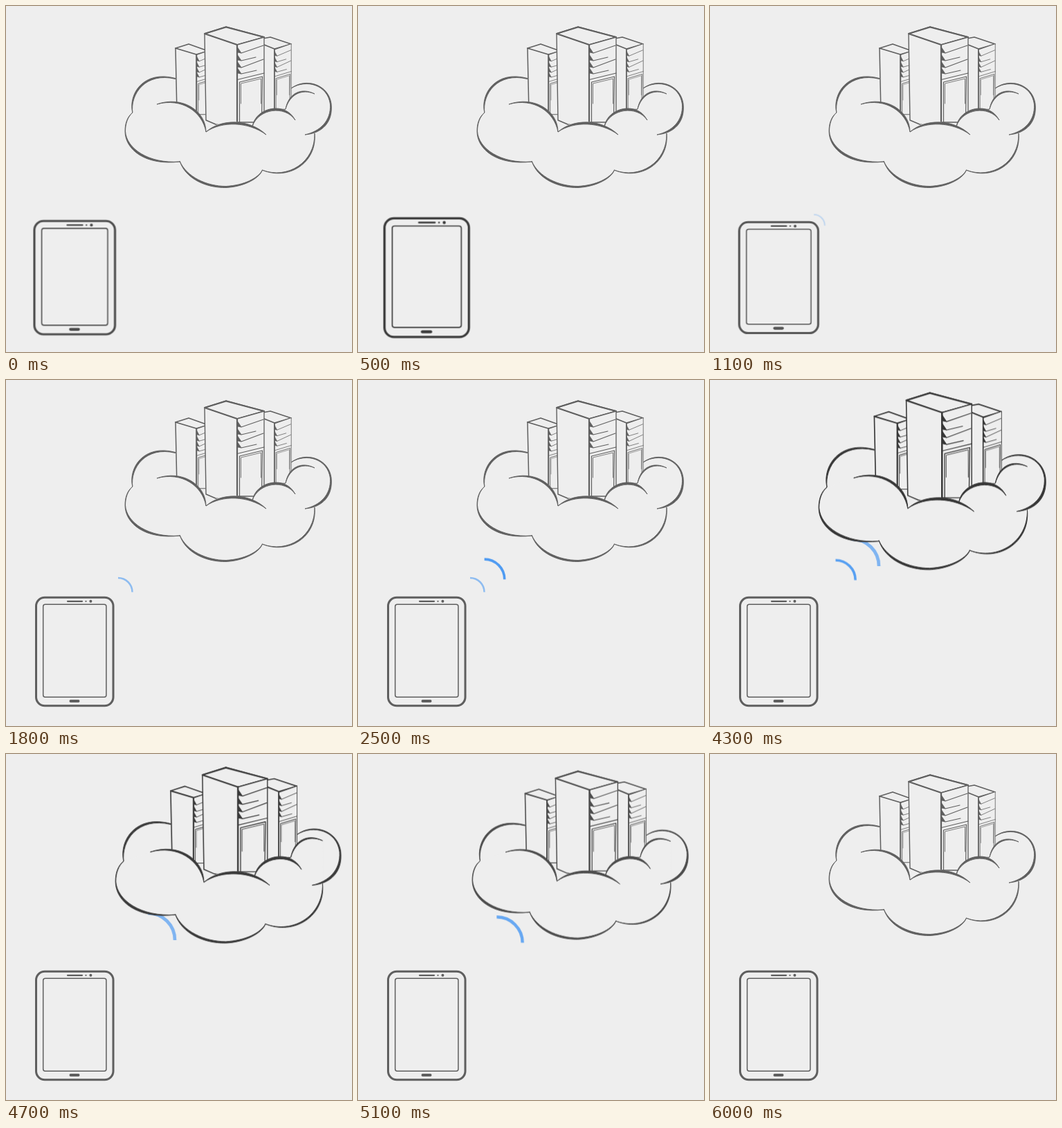
An HTML page without scripts that plays this animation: 500x500 px, repeating every 8000 ms.

```html
<!DOCTYPE html>
<html lang="en">
<head>
<meta charset="utf-8">
<title>Tablet to cloud</title>
<style>
  html, body { margin: 0; width: 100%; height: 100%; overflow: hidden; background: #eee; }
  svg { display: block; width: 100%; height: 100%; }

  .tablet, .cloud { color: #5f5f5f; }
  .tablet { transform-origin: 99.2px 392.5px; animation: tablet 8s infinite; }
  .cloud { transform-origin: 321.5px 146px; animation: cloud 8s infinite; }
  .line { fill: none; stroke: currentColor; stroke-linejoin: round; stroke-linecap: round; }
  .solid { fill: #eee; stroke: currentColor; stroke-linejoin: round; }
  .brush { fill: currentColor; stroke: currentColor; stroke-width: .9; stroke-linejoin: round; }
  .mask { fill: #eee; }

  /* waves grow out of one point inside the tablet, ten poses a second */
  .wave { fill: none; stroke: #4f9bf2; transform-origin: 110px 353px; opacity: 0;
          animation: 8s steps(2) infinite; }
  .near { animation-name: near; stroke-width: 2.5; }
  .mid { animation-name: mid; stroke-width: 3.8; }
  .far { animation-name: far; stroke-width: 4.8; }

  @keyframes tablet {
    0% { transform: scale(1.045); color: #4d4d4d; animation-timing-function: steps(2); }
    2.5% { transform: scale(1.13); color: #2c2c2c; animation-timing-function: steps(11); }
    16.25%, 100% { transform: none; color: #5f5f5f; }
  }
  @keyframes cloud {
    0%, 51.25% { transform: scale(1); color: #5f5f5f; animation-timing-function: steps(2); }
    53.75% { transform: scale(1.1); color: #373737; animation-timing-function: steps(1); }
    55% { transform: scale(1.127); color: #2c2c2c; animation-timing-function: steps(11); }
    68.75%, 100% { transform: scale(1); color: #5f5f5f; }
  }
  @keyframes near {
    0%, 12.5% { transform: scale(.45); opacity: 0; }
    15% { transform: scale(1.09); opacity: .6; }
    17.5% { transform: scale(.93); opacity: .6; }
    20% { transform: scale(1.03); opacity: .6; }
    22.5%, 46.25% { transform: scale(1); opacity: .6; animation-timing-function: steps(4); }
    51.25%, 100% { transform: scale(1); opacity: 0; }
  }
  @keyframes mid {
    0%, 25% { transform: scale(.4); opacity: 0; }
    28.75% { transform: scale(1.05); opacity: 1; }
    31.25% { transform: scale(.955); opacity: 1; }
    33.75% { transform: scale(1.02); opacity: 1; }
    36.25%, 51.25% { transform: scale(1); opacity: 1; }
    53.75% { transform: scale(.94); opacity: .95; }
    56.25% { transform: scale(1); opacity: .5; animation-timing-function: steps(1); }
    57.5%, 100% { transform: scale(1); opacity: 0; }
  }
  @keyframes far {
    0%, 36.25% { transform: scale(.32); opacity: 0; }
    40% { transform: scale(1.04); opacity: .7; }
    42.5% { transform: scale(.97); opacity: .7; }
    43.75%, 51.25% { transform: scale(1); opacity: .7; }
    53.75%, 58.75% { transform: scale(.978); opacity: .7; }
    63.75% { transform: scale(.932); opacity: .85; }
    66.25% { transform: scale(1); opacity: .5; animation-timing-function: steps(1); }
    67.5%, 100% { transform: scale(1); opacity: 0; }
  }
</style>
</head>
<body>
<svg viewBox="0 0 500 500">
  <defs>
    <!-- front of a server: slots above, door below -->
    <g id="front">
      <path class="solid" stroke-width="1.3" d="M0 0L39-11V112H0Z"/>
      <path class="line" stroke-width="1.1" d="M6 12L38 1M6 23L27 18M6 33L38 21M6 42L28 37M0 50.5L39 41"/>
      <path class="brush" d="M0 3L6 12 1 11ZM0 14L6 23 1 22ZM0 24L6 33 1 32ZM0 33L6 42 1 41Z"/>
      <path class="line" stroke-width="1.2" d="M3.5 112V54L36.5 46 35.5 105"/>
      <path class="line" stroke-width=".8" d="M5.5 85V56L34.5 49V85"/>
      <path class="line" stroke-width="2.2" d="M0 0V112"/>
    </g>
  </defs>

  <g class="tablet">
    <rect class="line" x="43.5" y="314.2" width="111.5" height="156.6" rx="12.5" stroke-width="3"/>
    <rect class="line" x="53.7" y="324.3" width="91.2" height="134" rx="3" stroke-width="1.5"/>
    <path class="line" stroke-width="2.2" d="M89 319.8H110"/>
    <circle cx="115.5" cy="319.8" r="1.1" fill="currentColor"/>
    <circle cx="122.4" cy="319.8" r="2" fill="currentColor"/>
    <path class="line" stroke-width="4" d="M93.5 464H104.5"/>
  </g>

  <path class="wave near" d="M162 286a20.5 20.5 0 0 1 20.5 20.5"/>
  <path class="wave mid" d="M186 254.5a30.5 30.5 0 0 1 30.5 30.5"/>
  <path class="wave far" d="M207 227a40 40 0 0 1 40 40"/>

  <g class="cloud">
    <path class="brush" d="M183 155C176 127 199 92 245 104.5V105.5C202 95 179 127 183 155Z"/>

    <!-- side servers -->
    <path class="solid" stroke-width="1.5" d="M245 61L264 55 292 65 275 70V155H247Z"/>
    <path class="line" stroke-width="1.8" d="M245 61L275 70"/>
    <use href="#front" transform="translate(275.5 70.5) scale(.63 .77)"/>
    <path class="solid" stroke-width="1.5" d="M366 48L382 45 412 55 388 62V155H366Z"/>
    <path class="line" stroke-width="1.8" d="M373 56L388 62"/>
    <use href="#front" transform="translate(388 63) scale(.62 .77)"/>

    <!-- middle server -->
    <path class="solid" stroke-width="1.4" d="M287 40L318 30 373 45 334 56V175L303 171 289 165Z"/>
    <use href="#front" transform="translate(334 56)"/>
    <path class="line" stroke-width="2" d="M334 56L287 40 318 30.5 373 45"/>

    <!-- lobes -->
    <path class="mask" d="M183 154C175 160 172 170 172 181C172 208 202 230 251 225C258 249 288 262 318 262C346 261 368 247 370 237C402 254 451 232 446 184L446 127C428 116 408 128 404 148V152C385 143 363 150 356 173C334 164 305 166 289 181C286 151 258 129 218 142Z"/>
    <path class="brush" d="M183 154C175 160 172 170 172 181C172 208 202 231 251 225C206 228 174 206 172.5 181C172.5 170 176 160 183 154Z"/>
    <path class="brush" d="M218 142C254 129 289 151 289 182C284 153 254 132 218 142Z"/>
    <path class="brush" d="M251 224C259 249 288 263 318 262.5C346 261 367 248 370.5 237C364 249 344 259 318 260.5C290 260.5 261 247 251 224Z"/>
    <path class="brush" d="M289 182C310 163 351 162 376 186C350 167 312 166 289 182Z"/>
    <path class="brush" d="M356 174C361 146 404 137 418 165C403 143 365 148 356 174Z"/>
    <path class="brush" d="M404 149C408 126 427 117 446 127C427 119 410 128 404 149Z"/>
    <path class="brush" d="M412 119C433 103 466 113 470 141C473 168 457 184 432 186C454 181 470 166 468.5 142C465 114 434 105 412 119Z"/>
    <path class="brush" d="M446 184C450 227 408 253 370 237C407 251 447 226 446 184Z"/>
  </g>
</svg>
</body>
</html>
```
